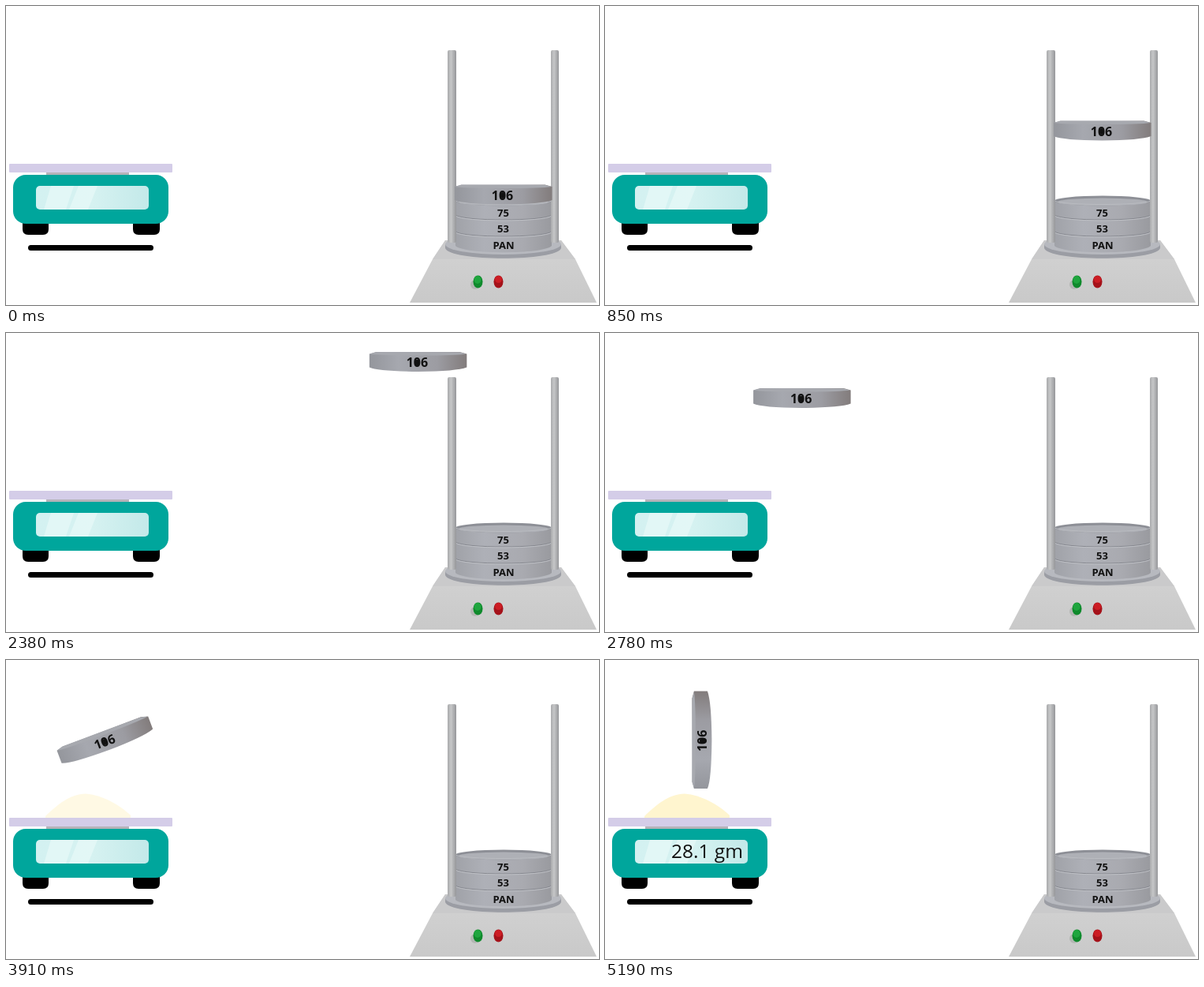
An HTML page for the animation above (5.35 s loop, 752 by 379 pixels).

```html
<!DOCTYPE html>
<html lang="en">
<head>
<meta charset="utf-8">
<title>Sieve weighing</title>
<style>
  html, body { margin: 0; width: 100%; height: 100%; overflow: hidden; background: #fff; }
  svg { display: block; width: 752px; height: 379px; }
  .label { font: bold 13px "Open Sans", "Noto Sans", sans-serif; text-anchor: middle; fill: #111; }
  .big { font-size: 16px; }
  .reading { font: 24.5px "Open Sans", "Noto Sans", sans-serif; text-anchor: end; fill: #111; }
</style>
</head>
<body>
<svg viewBox="0 0 752 379">
  <defs>
    <linearGradient id="glass">
      <stop offset="0" stop-color="#d3f1f1"/>
      <stop offset=".5" stop-color="#d6f2f1"/>
      <stop offset="1" stop-color="#c3e9e9"/>
    </linearGradient>
    <linearGradient id="rod">
      <stop offset="0" stop-color="#a9aaac"/>
      <stop offset=".4" stop-color="#c6c7c8"/>
      <stop offset="1" stop-color="#96979a"/>
    </linearGradient>
    <linearGradient id="steel">
      <stop offset="0" stop-color="#a0a2a8"/>
      <stop offset=".3" stop-color="#aeb0b7"/>
      <stop offset=".7" stop-color="#a9aab0"/>
      <stop offset="1" stop-color="#999a9f"/>
    </linearGradient>
    <linearGradient id="sieve">
      <stop offset="0" stop-color="#94969c"/>
      <stop offset=".3" stop-color="#a6a8af"/>
      <stop offset=".7" stop-color="#9c9ca2"/>
      <stop offset="1" stop-color="#827c7c"/>
    </linearGradient>
    <linearGradient id="front" x2="0" y2="1">
      <stop offset="0" stop-color="#d3d3d3"/>
      <stop offset="1" stop-color="#c9c9c9"/>
    </linearGradient>
  </defs>

  <!-- balance -->
  <path id="powder" d="M50 201V198C64 184 82 169.500 101 169.500C122 171 145 184 158 197V201Z" fill="#fff5cf"/>
  <rect x="51" y="208" width="105" height="8" fill="#b5b3b9"/>
  <rect x="4" y="200" width="207" height="11" rx="1" fill="#d4cde8"/>
  <path d="M21 272H54V283Q54 290 47 290H28Q21 290 21 283ZM161 272H195V283Q195 290 188 290H168Q161 290 161 283Z"/>
  <rect x="9" y="214" width="197" height="62" rx="16" fill="#00a69c"/>
  <rect x="38" y="228" width="143" height="30" rx="5" fill="url(#glass)"/>
  <path d="M57 228H86L76 258H48ZM92 228H116L104 258H80Z" fill="#e8f9f8" opacity=".7"/>
  <rect x="28" y="303" width="159" height="7" rx="3.500"/>
  <text id="reading" class="reading" x="175" y="251">28.1 gm</text>

  <!-- shaker -->
  <path d="M557 297H704L722 321L749 376H512L541 321Z" fill="url(#front)"/>
  <path d="M557 297H704L722 321H541Z" fill="#cacacb"/>
  <path d="M557 302V307C562 324 699 324 704 307V302Z" fill="#9b9da4"/>
  <ellipse cx="630.500" cy="302" rx="73.500" ry="13" fill="#b7b9bf"/>
  <path d="M570 247V304C580 315 682 315 692 304V247Z" fill="url(#steel)"/>
  <ellipse cx="631" cy="247" rx="61" ry="6.500" fill="#8d8f96"/>
  <ellipse cx="631" cy="248.500" rx="57" ry="5" fill="#aeb0b6"/>
  <path d="M570 247C580 253 682 253 692 247" fill="none" stroke="#b9bbc0"/>
  <path d="M570 265C580 273 682 273 692 265M570 286C580 294 682 294 692 286" fill="none" stroke="#85878e"/>
  <path d="M570 266C580 274 682 274 692 266M570 287C580 295 682 295 692 287" fill="none" stroke="#bfc1c6"/>
  <rect x="560" y="56" width="11" height="244" rx="2" fill="url(#rod)"/>
  <rect x="691" y="56" width="10" height="244" rx="2" fill="url(#rod)"/>
  <text class="label" x="630.500" y="266.500">75</text>
  <text class="label" x="630.500" y="287">53</text>
  <text class="label" x="631" y="307.500">PAN</text>
  <ellipse cx="595" cy="353" rx="6" ry="6" fill="#b3b6b3"/>
  <ellipse cx="598.500" cy="349.500" rx="6" ry="8" fill="#0f8a2c"/>
  <ellipse cx="598" cy="347" rx="4.500" ry="5" fill="#1fa53e"/>
  <ellipse cx="624.500" cy="349.500" rx="6" ry="8" fill="#a5121a"/>
  <ellipse cx="624.500" cy="346.500" rx="4.500" ry="4.500" fill="#cc1d24"/>

  <!-- moving sieve, drawn around its label -->
  <g id="ring">
    <path d="M-60.500-11L-52-13.500H54L63-11V6Q50 11 1 11.500Q-50 11-60.500 6Z" fill="url(#sieve)"/>
    <path d="M-60-11L-52-13.200H54L62-11Q50-9 1-9Q-48-9-60-11Z" fill="#a7a9af"/>
    <text class="label big" y="5.500">106</text>
    <ellipse cy="0" rx="2.500" ry="4" fill="#111"/>
  </g>
</svg>
<script>
  const LOOP = 5350, STEP = 40;
  const ring = document.getElementById('ring');
  const powder = document.getElementById('powder');
  const reading = document.getElementById('reading');

  const clamp = v => Math.min(1, Math.max(0, v));
  const ease = u => u < .5 ? 2 * u * u : 1 - 2 * (1 - u) ** 2;

  // progress of a move, counted in steps after a phase begins
  const part = (t, begin, delay, length) => {
    const k = Math.floor((t - begin) / STEP) + 1;
    return clamp((k - delay) / length);
  };

  function draw(t) {
    const lift = ease(part(t, 210, 3.3, 32));
    const carry = ease(part(t, 1900, 2.85, 31));
    const tip = part(t, 3590, 1, 35);
    const x = 629.5 - 504.5 * carry;
    const y = 240 - 220.8 * lift + 85.3 * carry;
    ring.setAttribute('transform', `translate(${x} ${y}) rotate(${-90 * tip} -1.6 -.5)`);
    powder.style.opacity = part(t, 3590, 2, 12.5);
    reading.style.visibility = t >= 5030 ? 'visible' : 'hidden';
  }

  const t0 = performance.now();
  function tick() {
    draw((performance.now() - t0) % LOOP);
    requestAnimationFrame(tick);
  }
  draw(0);
  requestAnimationFrame(tick);
</script>
</body>
</html>
```
